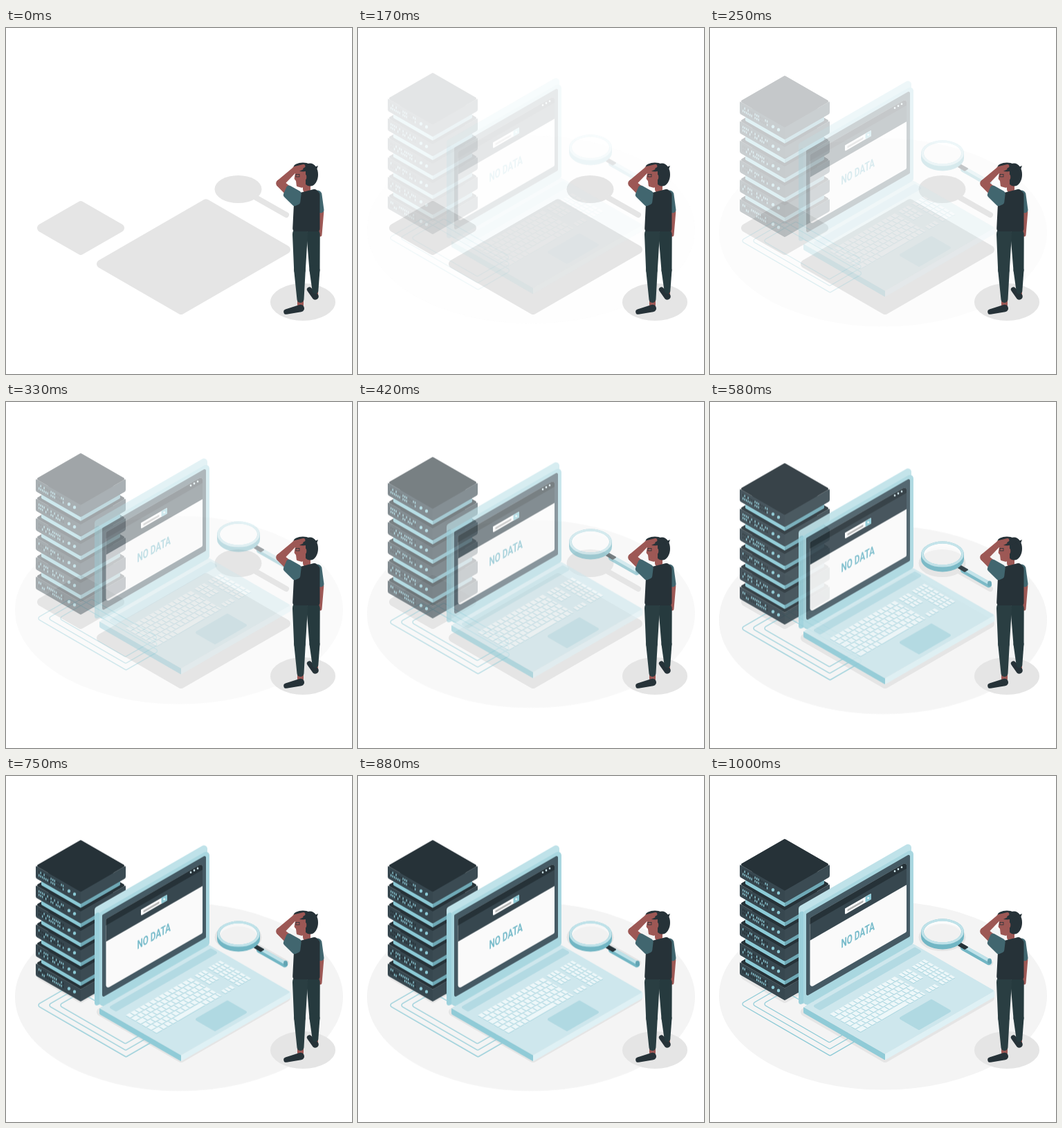
Animation of 500 by 500 pixels, one loop 1.04 s. Source, as an HTML page with a canvas:

```html
<!DOCTYPE html>
<html lang="en">
<head>
<meta charset="utf-8">
<title>No data</title>
<style>
html, body { margin: 0; width: 100%; height: 100%; overflow: hidden; background: #fff; }
canvas { display: block; width: 500px; height: 500px; }
</style>
</head>
<body>
<canvas id="stage"></canvas>
<script>
const SIZE = 500, LOOP = 1040, STEP = 1000 / 24;
const K = 0.577; // isometric slope
const dpr = window.devicePixelRatio || 1;
const DARK = '#263238', SLATE = '#37474f', SHADE = '#e5e5e5';
const TEAL = '#8ccad6', DEEP = '#72b6c4', PALE = '#bfe2e9';

function setup(c) {
  c.width = c.height = SIZE * dpr;
  const g = c.getContext('2d');
  g.scale(dpr, dpr);
  return g;
}

function layer(draw) {
  const c = document.createElement('canvas');
  draw(setup(c));
  return c;
}

// Closed outline with rounded corners
function trace(g, p, r) {
  const n = p.length, a = p[n - 1], b = p[0];
  g.beginPath();
  g.moveTo((a[0] + b[0]) / 2, (a[1] + b[1]) / 2);
  p.forEach((q, i) => g.arcTo(...q, ...p[(i + 1) % n], r));
  g.closePath();
}

function poly(g, fill, p, r = 0) {
  trace(g, p, r);
  g.fillStyle = fill;
  g.fill();
}

function oval(g, fill, x, y, rx, ry = rx) {
  g.beginPath();
  g.ellipse(x, y, rx, ry, 0, 0, 7);
  g.fillStyle = fill;
  g.fill();
}

// Tapered bar between two circles
function limb(g, fill, x1, y1, r1, x2, y2, r2) {
  const a = Math.atan2(y2 - y1, x2 - x1);
  const b = Math.acos((r1 - r2) / Math.hypot(x2 - x1, y2 - y1));
  g.beginPath();
  g.arc(x1, y1, r1, a + b, a - b + 2 * Math.PI);
  g.arc(x2, y2, r2, a - b, a + b);
  g.fillStyle = fill;
  g.fill();
}

// Flat rectangle: left corner, width down-right, depth up-right
function ground(x, y, w, d) {
  return [[x, y], [x + d, y - d * K], [x + d + w, y + (w - d) * K], [x + w, y + w * K]];
}

// Upright rectangle rising to the right
function wall(x, y, w, h) {
  const d = w * K;
  return [[x, y], [x + w, y - d], [x + w, y - d + h], [x, y + h]];
}

function prism(g, x, y, w, d, h, r, [top, left, right]) {
  const [a, b, c, f] = ground(x, y, w, d);
  const down = q => [q[0], q[1] + h];
  g.save();
  trace(g, [a, b, c, down(c), down(f), down(a)], r);
  g.clip();
  poly(g, left, [a, f, down(f), down(a)]);
  poly(g, right, [f, c, down(c), down(f)]);
  poly(g, top, [a, b, c, f], r / 2);
  g.restore();
}

function drawFloor(g) {
  oval(g, '#f4f4f4', 250, 317.5, 237, 136);
}

function drawShadows(g) {
  poly(g, SHADE, ground(39, 289, 69, 69), 6);
  poly(g, SHADE, ground(125, 341, 128, 164), 6);
  oval(g, SHADE, 335.5, 233, 34, 20);
  limb(g, SHADE, 361, 245, 4, 405, 270, 4);
  oval(g, SHADE, 429, 396, 47, 27);
}

function drawCables(g) {
  g.strokeStyle = TEAL;
  g.lineWidth = 1.2;
  for (let i = 0; i < 3; i++) {
    trace(g, ground(44 + 16 * i, 329.5, 129.5 - 16.5 * i, 48), 3);
    g.stroke();
  }
}

function drawServer(g) {
  let seed = 71;
  const random = () => (seed = (seed * 16807) % 2147483647) / 2147483647;
  for (let i = 5; i >= 0; i--) {
    const y = 128 + i * 28.2;
    prism(g, 43, y, 65, 65, 18, 4, [DARK, SLATE, '#3b4b53']);
    for (const row of [5, 10])
      for (let x = 47; x < 84; x += 2.5) {
        g.fillStyle = random() < 0.55 ? TEAL : DARK;
        g.fillRect(x, y + (x - 43) * K + row, 1.3, 3.2);
      }
    for (const x of [91, 99]) oval(g, TEAL, x, y + (x - 43) * K + 8.8, 2.2, 2.5);
    if (i) prism(g, 51, y - 12, 57, 57, 12, 2, [DARK, TEAL, '#6fa9b6']);
  }
}

function drawKeyboard(g) {
  const rows = 6;
  for (let j = 0; j < rows; j++) {
    // main block, cursor block, number pad
    for (const [from, to, n] of [[0, 0.69, 14], [0.72, 0.83, 3], [0.86, 1, 4]]) {
      const step = (to - from) / n, shift = n > 4 ? (j % 3) * 0.012 : 0;
      if (n === 3 && (j === 3 || j === 4)) continue;
      for (let i = 0; i < n; i++) {
        const space = n > 4 && j === rows - 1 && i === 4;
        const span = space ? 6 : 1;
        const l = from + i * step + (i ? shift : 0);
        const r = from + (i + span) * step + (i < n - 1 ? shift : 0);
        const x = 173 + 138 * l + 46 * j / rows, y = 344 - 138 * K * l + 46 * K * j / rows;
        const key = ground(x, y, 6.3, 138 * (r - l) - 1.3);
        poly(g, '#a9d5df', key.map(q => [q[0], q[1] + 1]));
        poly(g, '#edf7f9', key);
        i += span - 1;
      }
    }
  }
}

function drawScreen(g) {
  poly(g, PALE, wall(128, 189, 163, 144), 5);
  poly(g, '#9bd0db', wall(128, 198, 8, 134), 3);
  poly(g, '#a9d7e0', wall(135, 196, 159, 138), 5);
  poly(g, '#455a64', wall(139, 199, 150, 119.5), 2);

  g.save();
  trace(g, wall(144.5, 205, 139.5, 101), 3);
  g.clip();
  poly(g, '#fafafa', wall(140, 200, 150, 112));
  poly(g, SLATE, wall(144, 200, 141, 38));
  poly(g, DARK, wall(144, 200, 141, 14.5));
  g.restore();

  for (let x = 267; x < 278; x += 5) oval(g, '#d5ecf1', x, 137.5 - (x - 267) * K, 1.3, 1.6);
  poly(g, '#fff', wall(195, 191.5, 38, 8.5), 1);
  poly(g, '#b4b4b4', wall(198.5, 192.8, 23, 3));
  poly(g, TEAL, wall(224.5, 174.5, 8.5, 8.5), 1);
  oval(g, '#e4f2f5', 228.7, 176.2, 1.5);

  g.save();
  g.transform(0.67, -0.375, 0, 1, 189.5, 249);
  g.font = '600 17.5px Roboto, "Liberation Sans", sans-serif';
  g.fillStyle = '#78bccb';
  g.fillText('NO DATA', 0, 0);
  g.restore();
}

function drawLaptop(g) {
  prism(g, 135, 333.7, 118, 158.5, 9, 3, ['#cee7ed', '#90cbd7', '#dff1f5']);
  poly(g, '#b3dae3', ground(148, 332.5, 11, 148), 2);
  drawKeyboard(g);
  poly(g, '#b0d9e2', ground(272, 350, 30, 48), 2);
  drawScreen(g);
}

function drawLens(g) {
  limb(g, DEEP, 366, 248, 4.2, 403, 269, 4.2);
  limb(g, PALE, 367, 246, 2.2, 402, 266, 2.2);
  oval(g, '#62a4b3', 404, 267.5, 3, 4);
  poly(g, DARK, ground(356, 243, 12, 6).map(([x, y]) => [x, y + 1]), 1);

  const x = 336, y = 225, rx = 31, ry = 18.5;
  const hole = dy => g.ellipse(x, y + dy, rx - 4, ry - 3, 0, 0, 7);
  // rim with its outer side
  g.beginPath();
  g.ellipse(x, y, rx, ry, 0, Math.PI, 0);
  g.ellipse(x, y + 7, rx, ry, 0, 0, Math.PI);
  g.closePath();
  hole(0);
  g.fillStyle = DEEP;
  g.fill('evenodd');
  // glass and inner side
  oval(g, 'rgba(255,255,255,.45)', x, y, rx - 4, ry - 3);
  g.save();
  g.beginPath();
  hole(0);
  g.clip();
  g.beginPath();
  g.rect(x - rx, y - rx, 2 * rx, 2 * rx);
  hole(4.5);
  g.fill('evenodd');
  g.restore();
  // top face
  g.beginPath();
  g.ellipse(x, y, rx - 2, ry - 1.6, 0, 0, 7);
  g.strokeStyle = PALE;
  g.lineWidth = 3.4;
  g.stroke();
}

function drawPerson(g) {
  const skin = '#9d5855', cloth = '#2a3e42', sleeve = '#41666f';
  // arm at the side, ankles, shoes
  limb(g, skin, 455.3, 266, 4, 454, 299, 2.5);
  limb(g, skin, 447, 380, 4, 447, 386, 4);
  limb(g, skin, 425.5, 393, 4.5, 425.5, 400, 4.5);
  limb(g, DARK, 447, 388, 4.8, 438.5, 378, 3.6);
  limb(g, DARK, 425.7, 405, 5.3, 405, 410, 3.8);
  // legs
  limb(g, '#263a3e', 444, 298, 9.7, 446, 350, 7.5);
  limb(g, '#263a3e', 446, 350, 7.5, 447, 380, 4.3);
  limb(g, cloth, 425, 298, 11, 424.5, 350, 8.3);
  limb(g, cloth, 424.5, 350, 8.3, 425.5, 392, 5);
  // body
  limb(g, sleeve, 450, 241, 6.5, 455.3, 263, 4.2);
  limb(g, skin, 434.5, 222, 5.5, 434.5, 233, 5.5);
  poly(g, DARK, [[421, 239], [447, 232.5], [453.5, 239], [453.5, 294], [414, 294], [416, 254]], 4);
  // head
  oval(g, DARK, 439.5, 212, 11.5, 16.5);
  poly(g, skin, [[419, 204], [433, 204], [433, 226], [428, 231], [420, 229], [419, 221], [416.5, 218]], 2);
  oval(g, DARK, 429, 201, 13.5, 6.5);
  poly(g, DARK, [[441, 203], [451, 199], [448, 207]]);
  oval(g, skin, 431.5, 215.5, 2.8, 4.2);
  g.strokeStyle = DARK;
  g.lineWidth = 0.8;
  g.strokeRect(419, 211.5, 5, 3.5);
  // raised arm
  limb(g, skin, 396, 224.5, 5.6, 412, 239, 7);
  limb(g, skin, 396, 224.5, 5.6, 418, 204, 4);
  limb(g, skin, 418, 204, 4, 430, 199.5, 2.5);
  limb(g, skin, 419, 206, 3, 428, 203.5, 1.5);
  poly(g, sleeve, [[407, 226], [427, 237], [425, 254], [416, 258], [400, 242]], 4);
}

const shadows = layer(drawShadows);
const floor = layer(drawFloor);
const props = [drawCables, drawServer, drawLaptop].map(layer);
const lens = layer(drawLens);
const person = layer(drawPerson);
const ctx = setup(document.getElementById('stage'));

// cubic-bezier(.36, -.01, .5, 1.38)
function ease(x) {
  if (x >= 1) return 1;
  const bez = (s, a, b) => 3 * (1 - s) * (1 - s) * s * a + 3 * (1 - s) * s * s * b + s * s * s;
  let lo = 0, hi = 1;
  for (let i = 0; i < 24; i++) {
    const mid = (lo + hi) / 2;
    if (bez(mid, 0.36, 0.5) < x) lo = mid;
    else hi = mid;
  }
  return bez(lo, -0.01, 1.38);
}

function render(t) {
  const n = Math.floor((t + 5) / STEP);
  const p = n < 3 ? 0 : ease((n + 0.5) * STEP / 1000);
  const put = (c, y = 0) => ctx.drawImage(c, 0, y, SIZE, SIZE);
  const fall = (c, drop) => {
    ctx.globalAlpha = Math.min(1, p);
    put(c, drop * (p - 1));
    ctx.globalAlpha = 1;
  };
  ctx.fillStyle = '#fff';
  ctx.fillRect(0, 0, SIZE, SIZE);
  fall(floor, 30);
  put(shadows);
  props.forEach(c => fall(c, 30));
  fall(lens, 60);
  put(person);
}

const start = performance.now();
function tick() {
  render((performance.now() - start) % LOOP);
  requestAnimationFrame(tick);
}
tick();
</script>
</body>
</html>
```
